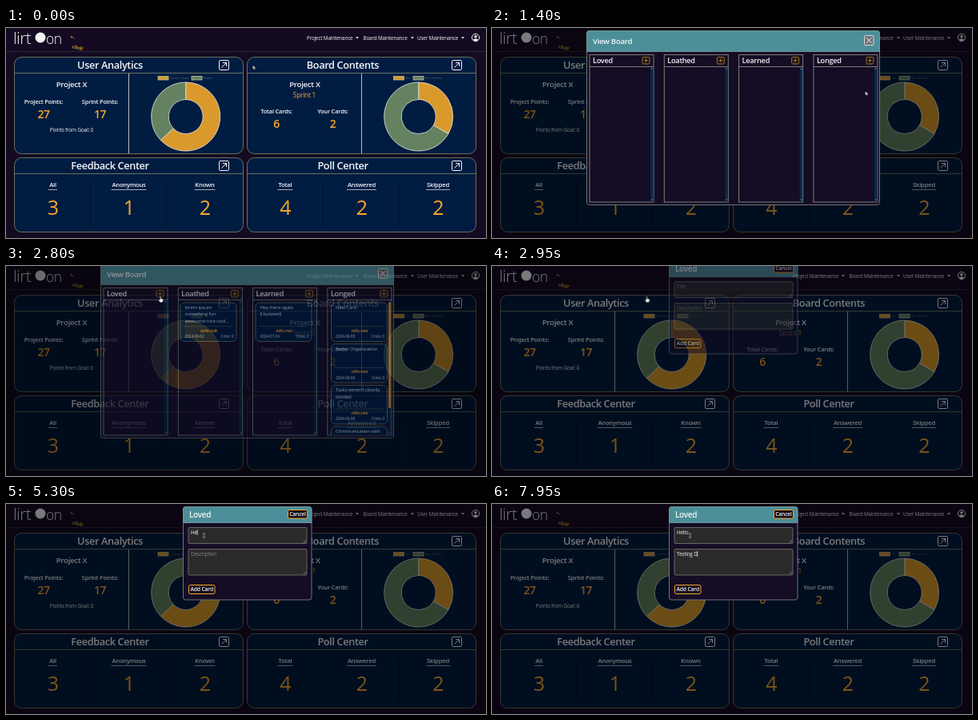
An HTML page for the animation above (8 s loop, 600 px wide and 263 px high).

```html
<!DOCTYPE html>
<html lang="en">
<head>
<meta charset="utf-8">
<title>Dashboard</title>
<style>
html, body { margin: 0; width: 100%; height: 100%; overflow: hidden; background: #140b22; }
svg { display: block; width: 100%; height: 100%; }
text { font-family: "Open Sans", "Noto Sans", sans-serif; letter-spacing: -.03em; white-space: pre; }
.b { font-weight: 600; }
.m { font-weight: 500; }
.thin { font-weight: 300; }
.i { font-style: italic; font-weight: 700; }

#backdrop { animation: dim 8s linear infinite; }
#board { animation: boardFade 8s linear infinite, boardSlide 8s ease-out infinite; }
#cards { animation: load 8s step-end infinite; }
#form { animation: formFade 8s linear infinite, formSlide 8s ease-out infinite; }
#pointer { animation: move 8s ease-in-out infinite; }
#arrow { animation: arrow 8s step-end infinite; }
#hand { animation: hand 8s step-end infinite; }
#beam { animation: beam 8s step-end infinite; }

@keyframes dim {
  0%, 11.75% { opacity: 0; }
  13.63%, 34.06% { opacity: .5; }
  35% { opacity: .56; }
  35.94%, 100% { opacity: .5; }
}
@keyframes boardFade {
  0%, 13.63% { opacity: 0; }
  15.5%, 34.25% { opacity: 1; }
  36.13%, 100% { opacity: 0; }
}
@keyframes boardSlide {
  0%, 13.63% { transform: translateY(-16px); }
  17.38%, 34.06% { transform: none; }
  37.81%, 100% { transform: translateY(-16px); }
}
@keyframes load { 0% { opacity: 0; } 18.75%, 100% { opacity: 1; } }
@keyframes formFade { 0%, 35.94% { opacity: 0; } 37.81%, 100% { opacity: 1; } }
@keyframes formSlide {
  0%, 35.94% { transform: translateY(-16px); }
  39.69%, 100% { transform: none; }
}
@keyframes move {
  0%, 1% { transform: translate(308.5px, 46.5px); }
  11%, 13.4% { transform: translate(566.5px, 47.5px); animation-timing-function: ease-in; }
  17.5% { transform: translate(467px, 79px); animation-timing-function: ease-out; }
  32%, 36.5% { transform: translate(193px, 38px); }
  42.5%, 100% { transform: translate(247.5px, 39.5px); }
}
@keyframes arrow {
  0% { visibility: visible; }
  31.5% { visibility: hidden; }
  37% { visibility: visible; }
  41%, 100% { visibility: hidden; }
}
@keyframes hand {
  0% { visibility: hidden; }
  31.5% { visibility: visible; }
  37%, 100% { visibility: hidden; }
}
@keyframes beam { 0% { visibility: hidden; } 41%, 100% { visibility: visible; } }
</style>
</head>
<body>
<svg id="stage" viewBox="0 0 600 263" xmlns="http://www.w3.org/2000/svg"></svg>
<script>
const GOLD = '#fba82b', AMBER = '#d9992b', GREEN = '#64825f', EDGE = '#64735d',
      NAVY = '#001c41', DARK = '#150c26', TEAL = '#4c8f98', WHITE = '#f4f5f7', PALE = '#b8bfb5';

const text = (x, y, s, size, { fill = WHITE, at = 'middle', cls = 'b', more = '' } = {}) =>
  `<text x="${x}" y="${y}" font-size="${size}" fill="${fill}" text-anchor="${at}" class="${cls}" ${more}>${s}</text>`;
const box = (x, y, w, h, fill, stroke = 'none', r = 0, sw = 1) =>
  `<rect x="${x}" y="${y}" width="${w}" height="${h}" rx="${r}" fill="${fill}" stroke="${stroke}" stroke-width="${sw}"/>`;
const path = (d, stroke, sw = 1, fill = 'none') =>
  `<path d="${d}" stroke="${stroke}" stroke-width="${sw}" fill="${fill}"/>`;
const left = { at: 'start' };
const plain = { at: 'start', cls: '' };

const openIcon = (x, y) => box(x - 6, y - 6, 12, 12, 'none', WHITE, 1.2) +
  path(`M${x - 3} ${y + 3}l6 -6m-4.5 0h4.5v4.5`, WHITE);

function panel(x, y, h, title) {
  return box(x, y, 286, h, NAVY, EDGE, 9) +
    path(`M${x} ${y + 20}h286`, EDGE) +
    text(x + 119.5, y + 14.3, title, 12.75) + openIcon(x + 262, y + 10);
}

function donut(cx, cy, share) {
  const R = 43, r = 21.5, a = share * 2 * Math.PI;
  const pt = (rad, ang) => `${cx + rad * Math.sin(ang)} ${cy - rad * Math.cos(ang)}`;
  const slice = (from, to, fill) => {
    const big = to - from > Math.PI ? 1 : 0;
    return path(`M${pt(R, from)}A${R} ${R} 0 ${big} 1 ${pt(R, to)}L${pt(r, to)}A${r} ${r} 0 ${big} 0 ${pt(r, from)}Z`,
      '#e9eae4', .8, fill);
  };
  return slice(0, a, AMBER) + slice(a, 2 * Math.PI, GREEN);
}

const legend = (x, label, fill) => box(x, 60.5, 13, 4.5, fill, '#b9bbae', 0, .8) +
  text(x + 14.5, 64.3, label, 3.9, { ...plain, fill: '#59616c' });

const stat = (x, y, label, value) => text(x, y, label, 7.5) + text(x, y + 18.6, value, 14, { fill: GOLD });

const tally = (x, label, value, half) => text(x, 198.7, label, 7.7) +
  path(`M${x - half} 202.5h${half * 2}`, '#cfd3d8', .8) +
  text(x, 233.5, value, 25, { fill: GOLD, cls: '' });

const navItem = (x, label, caret) => text(x, 14.7, label, 6.4, plain) +
  path(`M${caret - 2} 11.3h4l-2 2.3z`, 'none', 0, WHITE);

function page() {
  return box(0, 0, 600, 263, '#140b22') +
    text(9, 20, 'lirt', 21, { at: 'start', cls: 'thin' }) +
    `<circle cx="43" cy="12" r="6.5" fill="${WHITE}"/>` +
    text(50, 20, 'on', 17.5, { at: 'start', cls: 'thin' }) +
    text(82.5, 25, 'click!', 6, { at: 'start', cls: 'i', fill: '#c9962d', more: 'transform="rotate(14 82.5 25)"' }) +
    path('M85 13.5q-.5 -2.5 -4 -2.3m1.3 -1.2l-1.4 1.2l1.4 1.2', '#c9962d', .8) +
    path('M0 29.5h600', '#2b2a34') +
    navItem(376, 'Project Maintenance', 439) + navItem(446.5, 'Board Maintenance', 508) +
    navItem(514, 'User Maintenance', 571) +
    `<circle cx="587" cy="12" r="4.6" fill="none" stroke="${WHITE}"/><circle cx="587" cy="10.8" r="1.7" fill="${WHITE}"/>` +
    path('M583.7 14.8q3.3 -3 6.6 0q-3.3 3.2 -6.6 0z', 'none', 0, WHITE) +

    panel(10.5, 36.5, 121, 'User Analytics') + path('M153.5 57v100', PALE) +
    text(82, 74.1, 'Project X', 9.7) +
    stat(47, 94.5, 'Project Points:', 27) + stat(117.5, 94.5, 'Sprint Points:', 17) +
    text(82, 130.3, 'Points from Goal: 0', 6.5, { cls: '' }) +
    legend(190, 'Current Sprint', AMBER) + legend(232, 'Project', GREEN) + donut(224.7, 111, 17 / 27) +

    panel(301.5, 36.5, 121, 'Board Contents') + path('M444.5 57v100', PALE) +
    text(373.5, 74.1, 'Project X', 9.7) + text(373, 87, 'Sprint 1', 8.4, { fill: GOLD, cls: 'm' }) +
    stat(338, 106.5, 'Total Cards:', 6) + stat(408.5, 106.5, 'Your Cards:', 2) +
    legend(484.5, 'You', AMBER) + legend(509, 'Rest of Team', GREEN) + donut(515.7, 111, 1 / 3) +

    panel(10.5, 162.5, 93, 'Feedback Center') + panel(301.5, 162.5, 93, 'Poll Center') +
    tally(58.5, 'All', 3, 5.5) + tally(153.5, 'Anonymous', 1, 22) + tally(248.5, 'Known', 2, 13) +
    tally(349, 'Total', 4, 9.5) + tally(444.5, 'Answered', 2, 18.5) + tally(540, 'Skipped', 2, 15) +
    [105.5, 200.5, 396.5, 491.5].map(x => path(`M${x} 191v58`, '#00112b')).join('');
}

function dialog(x, y, w, h, head, title, size) {
  return box(x, y, w, h, DARK, '#6d7573', 3) +
    path(`M${x} ${y + head}v${3 - head}q0 -3 3 -3h${w - 6}q3 0 3 3v${head - 3}z`, '#7f9c9d', .8, TEAL) +
    text(x + 7.5, y + head / 2 + 3, title, size, left);
}

function column(x, title) {
  return box(x, 33.5, 80, 184.5, DARK, '#7b806f') + path(`M${x} 48.5h80`, '#7b806f') +
    box(x + 76, 49, 3.5, 168.5, '#06284f') +
    path(`M${x + 76.7} 51.8h2.2l-1.1 -1.5zM${x + 76.7} 214.5h2.2l-1.1 1.5z`, 'none', 0, '#7f93a8') +
    text(x + 4, 44, title, 9.2, left) +
    box(x + 66, 36.5, 9, 8.5, '#1c1418', '#c08a30', 1.5, .8) + path(`M${x + 68} 40.7h5m-2.5 -2.5v5`, '#c08a30', .8);
}

function card(x, y, lines, who, date, count) {
  return box(x, y, 70, 48.5, NAVY, EDGE, 5) +
    lines.map((s, i) => text(x + 5.5, y + 8 + i * 8.3, s, 6.1, plain)).join('') +
    path(`M${x + 4} ${y + 29.7}h62`, EDGE, .6) +
    text(x + 35.5, y + 36.5, who, 6, { fill: GOLD, cls: 'i' }) +
    text(x + 5.5, y + 43.8, date, 4.9, plain) +
    text(x + 66.5, y + 43.8, `Cmts: ${count}`, 4.9, { at: 'end', cls: '' });
}

function board() {
  const me = 'nilo.vex', other = 'orla.tuk';
  const longed = [
    [['New Card'], '2024-08-05'],
    [['Better Organization'], '2024-06-06'],
    [['Tasks weren\'t cleanly', 'divided'], '2024-06-06'],
    [['Communication with'], '2024-06-06']
  ];
  return dialog(118.5, 3.5, 366, 218, 26, 'View Board', 9.6) +
    box(465.5, 9.5, 11.5, 12, '#6b7478', '#d5dada', 1) + path('M468 12.2l6.5 6.6m0 -6.6l-6.5 6.6', WHITE) +
    ['Loved', 'Loathed', 'Learned', 'Longed'].map((s, i) => column(122 + i * 93.3, s)).join('') +
    `<clipPath id="body"><rect x="122" y="49" width="360" height="168.5"/></clipPath><g id="cards" clip-path="url(#body)">` +
    card(218, 52, ['lorem ipsum', 'something fun', 'awesome nice cool...'], other, '2024-06-02', 0) +
    card(312, 52, ['Hey there again', '(Updated)'], me, '2024-07-24', 2) +
    longed.map(([lines, date], i) => card(406.5, 52 + i * 51.7, lines, me, date, 0)).join('') +
    box(478.2, 52, 2.8, 132, AMBER) + '</g>';
}

const button = (x, y, w, h, label) => box(x, y, w, h, '#120c1c', GOLD, 1.8) +
  text(x + w / 2, y + h / 2 + 2.4, label, 6.8);

const field = (id, y, h) => box(228, y, 148, h, '#2b2a2b', '#66695f', 1) +
  path(`M371.5 ${y + h - 1}l3.5 -3.5m-1.5 3.5l1.5 -1.5`, '#a0a0a0', .6) +
  text(231, y + 8.6, '', 6.4, { ...plain, more: `id="${id}"` });

function form() {
  return dialog(221.5, 3.5, 160.5, 116.5, 20, 'Loved', 10) +
    button(352.5, 7.5, 24, 10.5, 'Cancel') +
    field('title', 29.5, 20) + field('desc', 56.5, 32.5) +
    button(228.5, 101.5, 32.5, 11, 'Add Card') +
    box(0, 0, .7, 7, WHITE).replace('<rect', '<rect id="caret"');
}

const pointer = `<g id="arrow">${path('M0 0v5.4l1.3 -1.1l.9 2l.9 -.4l-.9 -1.9h1.7z', '#111', .5, '#fff')}</g>
  <g id="hand">${path('M-.6 .3q.6 -.9 1.2 0v2.5l2.5 .7q.6 .4 .2 2l-.8 1.9h-3l-2 -3q.2 -1.1 1.9 .3z', '#111', .4, '#fff')}</g>
  <g id="beam">${path('M-1.4 -2.6h2.8m-1.4 0v5.2m-1.4 0h2.8', '#c4c4c4', .7)}</g>`;

const stage = document.getElementById('stage');
stage.innerHTML = page() + box(0, 0, 600, 263, '#000').replace('<rect', '<rect id="backdrop"') +
  `<g id="board">${board()}</g><g id="form">${form()}</g><g id="pointer">${pointer}</g>`;

const LOOP = 8000;
const inputs = [
  { id: 'title', hint: 'Title', value: 'Hello', focus: 3600, start: 5150, step: 110, y: 32 },
  { id: 'desc', hint: 'Description', value: 'Testing D', focus: 6100, start: 6650, step: 150, y: 59 }
];
for (const f of inputs) f.el = document.getElementById(f.id);
const caret = document.getElementById('caret');
const clock = document.getAnimations()[0];

function draw() {
  const t = ((clock ? clock.currentTime : performance.now()) || 0) % LOOP;
  let active = null, lastKey = 0;
  for (const f of inputs) {
    const n = Math.max(0, Math.min(f.value.length, Math.floor((t - f.start) / f.step) + 1));
    const shown = n ? f.value.slice(0, n) : f.hint;
    if (f.el.textContent !== shown) f.el.textContent = shown;
    f.el.setAttribute('fill', n ? WHITE : '#85857f');
    if (t >= f.focus) {
      active = { ...f, n };
      lastKey = n ? f.start + (n - 1) * f.step : f.focus;
    }
  }
  const on = active && Math.floor((t - lastKey) / 530) % 2 === 0;
  caret.setAttribute('opacity', on ? 1 : 0);
  if (on) {
    caret.setAttribute('x', 230.8 + (active.n ? active.el.getComputedTextLength() : -.6));
    caret.setAttribute('y', active.y);
  }
  requestAnimationFrame(draw);
}
draw();
</script>
</body>
</html>
```
